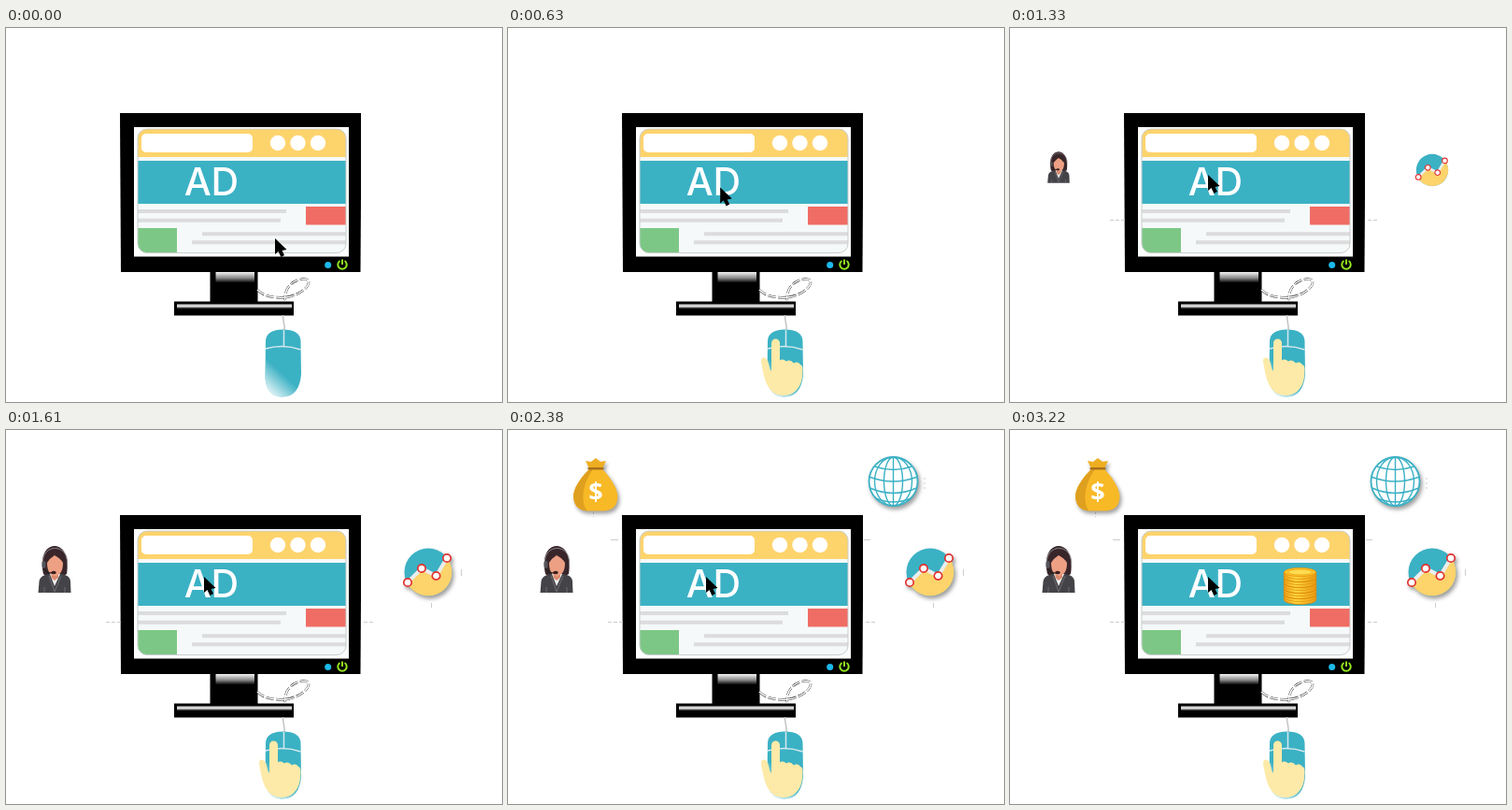
These frames come from a looping animation (531x400 px, 3500 ms). An HTML page:

```html
<!DOCTYPE html>
<html lang="en">
<head>
<meta charset="utf-8">
<title>Online advertising</title>
<style>
  html, body { margin: 0; width: 100%; height: 100%; overflow: hidden; background: #fff; }
  svg { display: block; width: 100%; height: 100%; }
  text { font-family: Inter, "Open Sans", sans-serif; fill: #fff; text-anchor: middle; }
  .dollar { font-family: "Open Sans", sans-serif; }
  .lifted { filter: drop-shadow(2px 3px 2px rgba(0, 0, 0, .38)); }
</style>
</head>
<body>
<svg viewBox="0 0 531 400">
  <defs>
    <linearGradient id="neck" x2="0" y2="1">
      <stop offset="0" stop-color="#f4f4f4"/><stop offset=".2" stop-color="#888"/><stop offset=".36" stop-color="#000"/>
    </linearGradient>
    <linearGradient id="foot" x2="0" y2="1">
      <stop offset="0" stop-color="#555"/><stop offset=".45" stop-color="#fff"/><stop offset="1" stop-color="#222"/>
    </linearGradient>
    <linearGradient id="shine" x1=".65" y1=".3" x2=".3" y2="1">
      <stop offset=".5" stop-color="#fff" stop-opacity="0"/><stop offset="1" stop-color="#fff" stop-opacity=".8"/>
    </linearGradient>
    <linearGradient id="gold">
      <stop offset="0" stop-color="#ee9f15"/><stop offset=".35" stop-color="#ffd83f"/><stop offset="1" stop-color="#ec9a10"/>
    </linearGradient>
    <clipPath id="card"><rect x="141" y="108" width="223" height="132.5" rx="10"/></clipPath>
    <clipPath id="disc"><circle r="25.5"/></clipPath>
    <path id="wire" d="M269 280C276 287 287 289 300 288C314 286 325 277 324 271C322 266 309 269 304 275C299 280 298 288 299 291"/>
    <path id="shell" d="M278 335C278 327 284 323 296 322.500C309 322.500 315.500 327 315.500 335L316 370C315 386 308 394.500 296 394.500C284 394.500 277 386 277.500 370Z"/>
  </defs>

  <!-- monitor -->
  <path d="M122 91H380V180L379.500 261H123Z"/>
  <rect x="137" y="106" width="230" height="138.5" fill="#fcfefe"/>
  <g clip-path="url(#card)">
    <rect x="141" y="108" width="223" height="133" fill="#f5f9f9"/>
    <rect x="141" y="108" width="223" height="30" fill="#fdd36c"/>
    <rect x="145" y="113" width="119" height="20" rx="5" fill="#fff"/>
    <g fill="#fff"><circle cx="291" cy="123" r="8.2"/><circle cx="312.5" cy="123" r="8.2"/><circle cx="334" cy="123" r="8.2"/></g>
    <rect x="141" y="142" width="223" height="46" fill="#3bb1c4"/>
    <path d="M141 196H300M141 205.700H294M210 220.300H364M199 229.300H364" stroke="#dcdcdc" stroke-width="4"/>
    <rect x="321" y="191" width="43" height="19.500" fill="#ef6d64"/>
    <rect x="141" y="214" width="42" height="27" fill="#7dc786"/>
  </g>
  <rect x="141" y="108" width="223" height="132.500" rx="10" fill="none" stroke="#c9cdcd"/>
  <text x="219.700" y="178.700" font-size="41" font-weight="500" letter-spacing="-.5">AD</text>
  <circle cx="344.700" cy="253.500" r="3.500" fill="#1cb9ea"/>
  <path d="M357.500 249A4.700 4.700 0 1 0 362.500 249M360 247.500V253" fill="none" stroke="#93e51f" stroke-width="2"/>
  <path d="M218.500 260H269.500V294H218.500Z"/>
  <path d="M224.500 261H266V293H224.500Z" fill="url(#neck)"/>
  <path d="M180 292.500H308V307.500H180Z"/>
  <path d="M183 295H306V300H183Z" fill="url(#foot)"/>

  <!-- cable and mouse -->
  <g fill="none">
    <use href="#wire" stroke="#222" stroke-width="2.400" stroke-dasharray="9 2"/>
    <use href="#wire" stroke="#fff" stroke-width="1.500"/>
    <path d="M296.500 307C296 313 299 317 298 324" stroke="#c4c4c4" stroke-width="1.500"/>
  </g>
  <use href="#shell" fill="#3bb1c4"/>
  <use href="#shell" fill="url(#shine)"/>
  <path d="M278 343Q297 337.500 315.500 344M297.500 323V340" fill="none" stroke="#d5e9ed" stroke-width="1.500"/>
  <path id="hand" fill="#fdeaa8" d="M282 367V337A4.500 4.500 0 0 1 291 337V355.500Q294 353 298 356.500Q302 354 306 358.500Q310 356 313 360Q316 361 315.500 367C315 378 313 384 307 389C301 394 291 394 285 390.500C278 386 275 377 273 368L271 357Q270.500 352.500 274 352.500Q277 353 278.500 357L280.500 365Z"/>

  <!-- faint marks -->
  <g fill="none" stroke="#ccc">
    <path id="marksLow" d="M107 205.500H123M383 205.500H395" stroke-dasharray="4 2"/>
    <path id="marksHigh" d="M110 117.500H118M381 117.500H388"/>
    <path id="marksChart" d="M487.500 149V156M455.500 185V190"/>
    <path id="marksBag" d="M91.500 84V93" stroke-dasharray="2 2"/>
    <path id="marksGlobe" d="M446 51V65" stroke-dasharray="2 3"/>
  </g>

  <!-- icons, each centred on 0,0 -->
  <g id="person">
    <path d="M-12 5C-15-8-13-24 0-25C13-24 15-8 13 5Q7 9 0 9Q-8 9-12 5Z" fill="#39262a"/>
    <path d="M-17.500 25L-16.500 13Q-15.500 7.500-10 6L-3 4H4L11 6Q16.500 7.500 17 13L17.500 25Z" fill="#444448"/>
    <path d="M-5 5L0 18 6 5Z" fill="#f1f1f1"/>
    <path d="M-3.500 2H4V9L0 12-3.500 9Z" fill="#d98c70"/>
    <path d="M-8-7Q-5-12 0-15Q6-12 9-7Q9 6 .5 7Q-8 6-8-7Z" fill="#eda083"/>
    <path d="M-12.500-6C-14-28 15-28 13.500-6" fill="none" stroke="#85858a" stroke-width="1"/>
    <path d="M-11-5V0Q-9 4-2 4" fill="none" stroke="#222" stroke-width="1.200"/>
    <rect x="-13.500" y="-9" width="4" height="8" rx="2" fill="#55555a"/>
    <ellipse cx="-1" cy="3.500" rx="2.800" ry="1.700" fill="#3a1d20"/>
    <path d="M-6 7L0 24 7 7M-11 19V25M11 19V25" fill="none" stroke="#77777b" stroke-width=".8"/>
  </g>
  <g id="chart">
    <circle r="25.500" fill="#3bb1c4"/>
    <path clip-path="url(#disc)" d="M-30 18L-22 11-7-4 8 4 20-15 30-15V30H-30Z" fill="#fdd36c"/>
    <path d="M-22 11L-7-4 8.500 4 20-15" fill="none" stroke="#e9eeee" stroke-width="4"/>
    <g fill="#fff" stroke="#e0322f" stroke-width="1.700"><circle cx="-22" cy="11" r="4.200"/><circle cx="-7" cy="-4" r="4.200"/><circle cx="8.500" cy="4" r="4.200"/><circle cx="20" cy="-15" r="4.200"/></g>
  </g>
  <g id="bag">
    <path d="M-7-18C-13-12-23-1-24 10C-24 21-18 26-9 26.500H9C18 26 23.500 21 23.500 10C22-1 13-12 7-18Z" fill="#f8b926"/>
    <path d="M-7-18C-13-12-23-1-24 10C-24 21-18 26-9 26.500C-17 18-14-3-3-18Z" fill="#dfa01f"/>
    <path d="M-7-19L-11-27-5-26 0-30 5-26 11-27 7-19Z" fill="#eeae22"/>
    <rect x="-8.500" y="-20" width="17" height="2.500" rx="1.200" fill="#a9701c"/>
    <text class="dollar" y="14.500" font-size="27" font-weight="700">$</text>
  </g>
  <g id="globe" fill="none" stroke="#3bb1c4" stroke-width="1.400">
    <circle r="26" fill="#fff" stroke-width="1.800"/>
    <ellipse rx="10" ry="26"/><ellipse rx="20" ry="26"/>
    <path d="M0-26V26M-20-16Q0-9 20-16M-26-5Q0 5 26-5M-25 7Q0 18 25 7M-19 18Q0 26 19 18"/>
  </g>

  <g id="coins"></g>
  <path id="cursor" d="M0 0V17L3.500 14 6.500 20 10 18 7.500 13 12.500 12Z"/>
</svg>
<script>
  const STEP = 70, LOOP = 3500;
  const $ = id => document.getElementById(id);
  const show = (el, on) => el.setAttribute('visibility', on ? 'visible' : 'hidden');
  const place = (el, x, y, s = 1) => el.setAttribute('transform', `translate(${x} ${y}) scale(${s})`);
  const clamp = (v, max) => Math.max(0, Math.min(max, v));
  const easeOut = p => 1 - (1 - p) ** 2;

  const icons = [
    { id: 'person', x: 52, y: 149, first: 17, steps: 7 },
    { id: 'chart', x: 452, y: 152, first: 17, steps: 7, shadow: true },
    { id: 'bag', x: 94, y: 60, first: 29, steps: 6, shadow: true },
    { id: 'globe', x: 412.5, y: 55, first: 29, steps: 6, shadow: true }
  ];

  // First step at which each group of marks is visible.
  const marks = { marksLow: 12, marksChart: 23, marksHigh: 25, marksBag: 29, marksGlobe: 34 };

  const coins = Array.from({ length: 5 }, () => {
    const g = document.createElementNS('http://www.w3.org/2000/svg', 'g');
    g.innerHTML = `<path d="M-17.200 0V5.500A17.200 5 0 0 0 17.200 5.500V0Z" fill="url(#gold)" stroke="#d9860c" stroke-width=".9"/>
      <path d="M-17 2.500A17 5 0 0 0 17 2.500" fill="none" stroke="#e39a14" stroke-width=".9"/>
      <ellipse rx="17" ry="4.600" fill="#fbc52c" stroke="#e5950f" stroke-width=".8"/>
      <ellipse rx="13" ry="3" fill="#ffdc4f" stroke="#eba51b" stroke-width=".8"/>`;
    return $('coins').appendChild(g);
  });

  function drawIcon({ id, x, y, first, steps, shadow }, tick) {
    const p = clamp(tick - first + 1, steps) / steps;
    show($(id), p > 0);
    place($(id), x, y, easeOut(p));
    $(id).classList.toggle('lifted', Boolean(shadow) && p === 1);
  }

  // Each coin takes two steps: small above the pile, then landed.
  function drawCoin(coin, i, tick) {
    const k = clamp(tick - 36 - 2 * i, 2);
    show(coin, k > 0);
    place(coin, 310.5, 176 - 6 * i - (k === 1 ? 5 : 0), k / 2);
  }

  function draw(ms) {
    const tick = Math.floor((ms % LOOP) / STEP + 1e-6);

    const move = tick >= 10 ? 10 : clamp(tick - 1, 8);
    place($('cursor'), 288 - 7.6 * move, 225 - 6.8 * move);

    const rise = clamp(tick - 1, 8) / 8;
    show($('hand'), rise > 0);
    place($('hand'), 0, 67 * (1 - rise));

    icons.forEach(icon => drawIcon(icon, tick));
    coins.forEach((coin, i) => drawCoin(coin, i, tick));
    for (const id in marks) show($(id), tick >= marks[id]);
  }

  const start = performance.now();
  function loop(now) {
    draw(Math.max(0, now - start));
    requestAnimationFrame(loop);
  }
  draw(0);
  requestAnimationFrame(loop);
</script>
</body>
</html>
```
